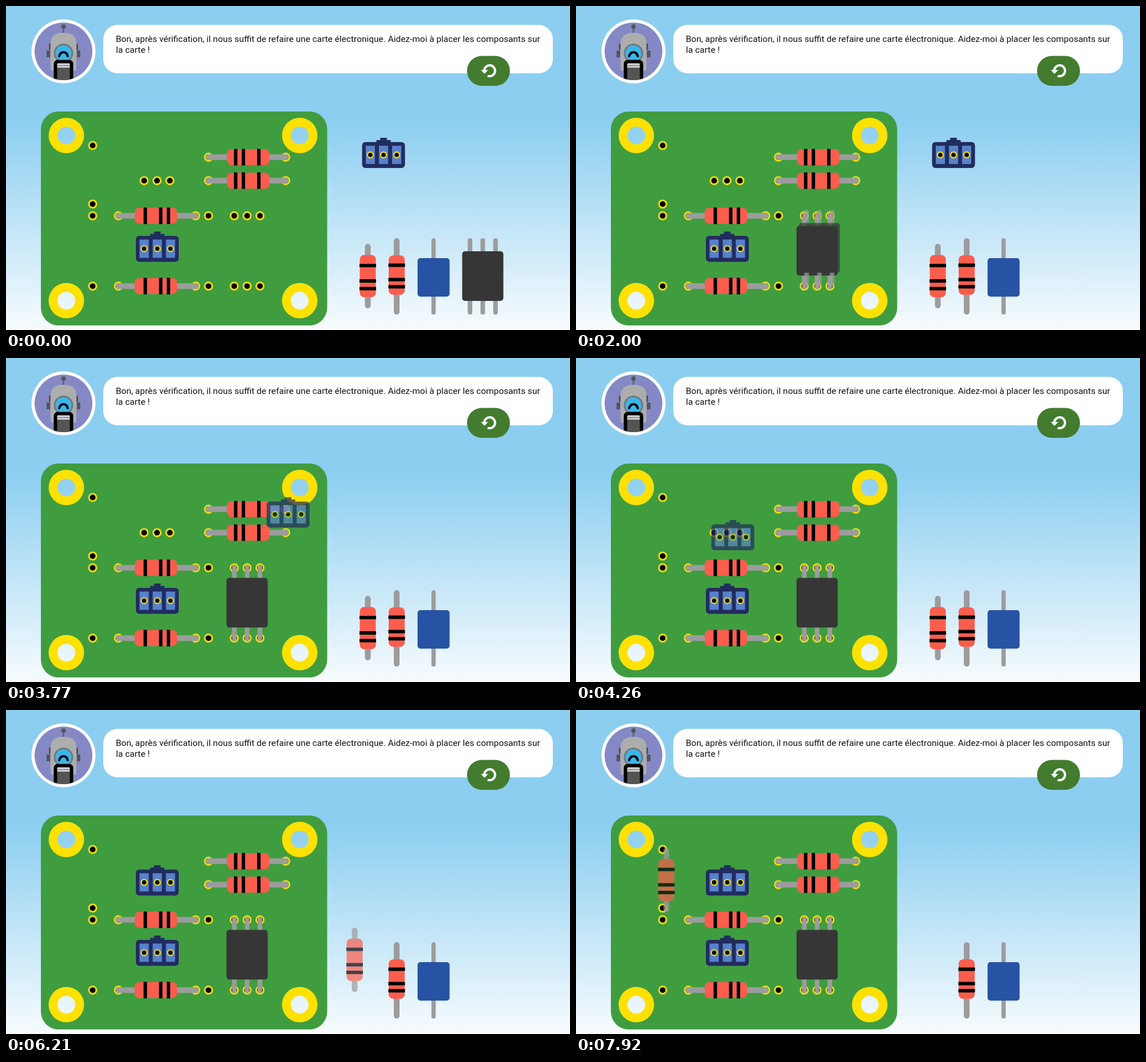
An HTML page for the animation above (7.99 s loop, 986 by 568 pixels).

```html
<!DOCTYPE html>
<html lang="fr">
<head>
<meta charset="utf-8">
<title>Carte électronique</title>
<style>
  html, body { margin: 0; width: 100%; height: 100%; overflow: hidden; }
  svg { display: block; width: 986px; height: 568px; }
  text { font: 15.44px Roboto, sans-serif; fill: #111; }
</style>
</head>
<body>
<svg viewBox="0 0 986 568">
  <defs>
    <linearGradient id="sky" gradientUnits="userSpaceOnUse" x1="0" y1="200" x2="0" y2="568">
      <stop offset="0" stop-color="#8bcef0"/>
      <stop offset="1" stop-color="#f7fbfe"/>
    </linearGradient>
    <mask id="holes"></mask>
    <clipPath id="face"><circle cx="100.5" cy="79.5" r="50.5"/></clipPath>
  </defs>
  <rect width="986" height="568" fill="url(#sky)"/>

  <circle cx="100.5" cy="79.5" r="56" fill="#fff"/>
  <circle cx="100.5" cy="79.5" r="50.5" fill="#8489c5"/>
  <g clip-path="url(#face)">
    <path d="M100.5 36V50" stroke="#555" stroke-width="2"/>
    <circle cx="100.5" cy="36" r="4" fill="#555"/>
    <path d="M71 78h6v12h-6zM124 78h6v12h-6zM75 66h6v11h-6zM120 66h6v11h-6z" fill="#555"/>
    <path d="M78 113V64Q79 47 100.5 47T123 64V113Z" fill="#adadad"/>
    <circle cx="100.5" cy="83" r="17" fill="#777"/>
    <circle cx="100.5" cy="83" r="14" fill="#3bb6ea"/>
    <path d="M93 88Q95 81 100.5 81T108 88" fill="none" stroke="#000" stroke-width="4" stroke-linecap="round"/>
    <rect x="87" y="98" width="27" height="32" fill="#555"/>
    <rect x="89" y="100" width="23" height="8" fill="#d8d8dc"/>
    <path d="M90 104.5H111" stroke="#8d8d95" stroke-width="2"/>
    <path d="M86.5 125V102Q86.5 97.5 91 97.5H110Q114.5 97.5 114.5 102V125" fill="none" stroke="#000" stroke-width="6" stroke-linecap="round"/>
  </g>

  <rect x="170" y="33" width="786" height="85" rx="25" fill="#fff"/>
  <text x="192" y="63">Bon, après vérification, il nous suffit de refaire une carte électronique. Aidez-moi à placer les composants sur</text>
  <text x="192.3" y="81.7">la carte !</text>
  <rect x="806" y="87.5" width="75" height="52.5" rx="26" fill="#437c2e"/>
  <path d="M836 114A9.5 9.5 0 1 1 842 122.4" fill="none" stroke="#fff" stroke-width="4"/>
  <path d="M830 112H843L836.5 119Z" fill="#fff"/>

  <g id="board"></g>
  <g id="parts"></g>
</svg>
<script>
const LOOP = 7990, GHOST_OPACITY = 0.7, DROP_DELAY = 50, GHOST_LINGER = 110;
const $ = id => document.getElementById(id);

const rect = (x, y, w, h, fill, rx = 0) =>
  `<rect x="${x}" y="${y}" width="${w}" height="${h}" rx="${rx}" fill="${fill}"/>`;
const box = (y, w, h, fill, rx) => rect(-w / 2, y - h / 2, w, h, fill, rx);
const disc = (x, y, r, fill) => `<circle cx="${x}" cy="${y}" r="${r}" fill="${fill}"/>`;
const at = (content, [x, y], turn = 0) =>
  `<g transform="translate(${x} ${y}) rotate(${turn})">${content}</g>`;
const pad = ([x, y], r = 8) => disc(x, y, r, '#f0da12') + disc(x, y, r * 0.62, '#000');
const lead = (x, length, width) =>
  rect(x - width / 2, -length / 2, width, length, '#9c9c9c', width / 2);
const triple = (pitch, shape) => [-pitch, 0, pitch].map(shape).join('');

// Parts are drawn around their own centre; resistor bodies may sit off-centre.
const resistor = (length, body, shift = 0) =>
  lead(0, length, 10) + box(shift, 28, body, '#fb5d4c', 7.5) +
  [-0.25, 0.115, 0.297].map(k => box(shift + k * body, 29, 6, '#000')).join('');
const connector = at(
  box(-22, 25, 8, '#222c5e', 1) + box(-26, 11.5, 8, '#222c5e') + box(0.3, 75, 45.5, '#222c5e', 6) +
  triple(23, x => rect(x - 8, -16, 16, 32, '#5782cb') + pad([x, 0], 6.2)), [0.5, -4]);
const chip = triple(22.3, x => lead(x, 134, 8)) + box(-0.5, 72, 87, '#363636', 5);
const capacitor = lead(0, 134, 7.5) + box(1.7, 56, 67.5, '#2653a3', 5);
const flatResistor = resistor(145, 74, -2);

// Board positions are counted in columns and rows of the hole grid.
const cell = (col, row) => [151.5 + 22.5 * col, 244.5 + 20.55 * row];
const footprint = (col, row, cols, rows) =>
  pad(cell(col, row)) + pad(cell(col + cols, row + rows));
const flatSlots = [[12, 1, 90], [12, 3, 90], [5, 6, -90], [5, 12, -90]];
const mounts = [105.5, 513.5].flatMap(x => [227, 516.5].map(y => [x, y]));

$('holes').innerHTML = rect(0, 0, 986, 568, '#fff') +
  mounts.map(([x, y]) => disc(x, y, 15.5, '#000')).join('');
$('board').innerHTML =
  `<g mask="url(#holes)">${rect(61, 185, 500.5, 375, '#3f9d3f', 31)}
    ${mounts.map(([x, y]) => disc(x, y, 31, '#ffe100')).join('')}</g>` +
  footprint(0, 0, 0, 5) + footprint(0, 6, 0, 6) + footprint(9, 6, 0, 6) +
  triple(1, i => pad(cell(5 + i, 3)) + footprint(12 + i, 6, 0, 6)) +
  flatSlots.map(([col, row, turn]) =>
    footprint(col - 3, row, 6, 0) + at(flatResistor, cell(col, row), turn)).join('') +
  at(connector, cell(5, 9));

const easeIn = power => k => k ** power;
const easeOut = power => k => 1 - (1 - k) ** power;
const smooth = k => k ** 3 * (10 - 15 * k + 6 * k * k);
const move = (start, end, to, easeX = smooth, easeY = easeX) => ({ start, end, to, easeX, easeY });

// A part with a slot snaps into it shortly after its last move.
const parts = [
  { art: resistor(134, 69, -2.3), home: [683, 474] },
  { art: capacitor, home: [747.5, 474] },
  { art: chip, home: [833.5, 474], slot: cell(12, 9),
    moves: [move(1450, 1950, [425.5, 424.5], easeOut(1.9), easeOut(1.9))] },
  { art: connector, home: [659.5, 265], slot: cell(5, 3),
    moves: [move(3580, 4330, [269.5, 324], easeOut(1.9), easeIn(1.1))] },
  { art: resistor(113, 74), home: [632.5, 473.5],
    moves: [
      move(6070, 6820, [164, 407.5], smooth, easeOut(3.7)),
      move(6820, 7380, [152, 431]),
      move(7570, 7920, [158, 298])
    ] }
];

function layer(art, opacity) {
  const node = document.createElementNS('http://www.w3.org/2000/svg', 'g');
  node.innerHTML = art;
  node.setAttribute('opacity', opacity);
  $('parts').append(node);
  return node;
}
for (const part of parts) {
  part.body = layer(part.art, 1);
  part.ghost = layer(part.art, GHOST_OPACITY);
}

function show(node, visible, [x, y]) {
  node.style.display = visible ? '' : 'none';
  node.setAttribute('transform', `translate(${x} ${y})`);
}

function position(home, moves, t) {
  return moves.reduce(([x, y], { start, end, to, easeX, easeY }) => {
    const k = Math.min(1, Math.max(0, (t - start) / (end - start)));
    return [x + (to[0] - x) * easeX(k), y + (to[1] - y) * easeY(k)];
  }, home);
}

function draw(t) {
  for (const { body, ghost, home, slot, moves = [] } of parts) {
    const lifted = moves.length > 0 && t >= moves[0].start;
    const sinceStop = slot ? t - moves.at(-1).end : -Infinity;
    const placed = sinceStop >= DROP_DELAY;
    show(body, placed || !lifted, placed ? slot : home);
    show(ghost, lifted && sinceStop < GHOST_LINGER, position(home, moves, t));
  }
}

const start = performance.now();
function tick() {
  draw((performance.now() - start) % LOOP);
  requestAnimationFrame(tick);
}
tick();
</script>
</body>
</html>
```
